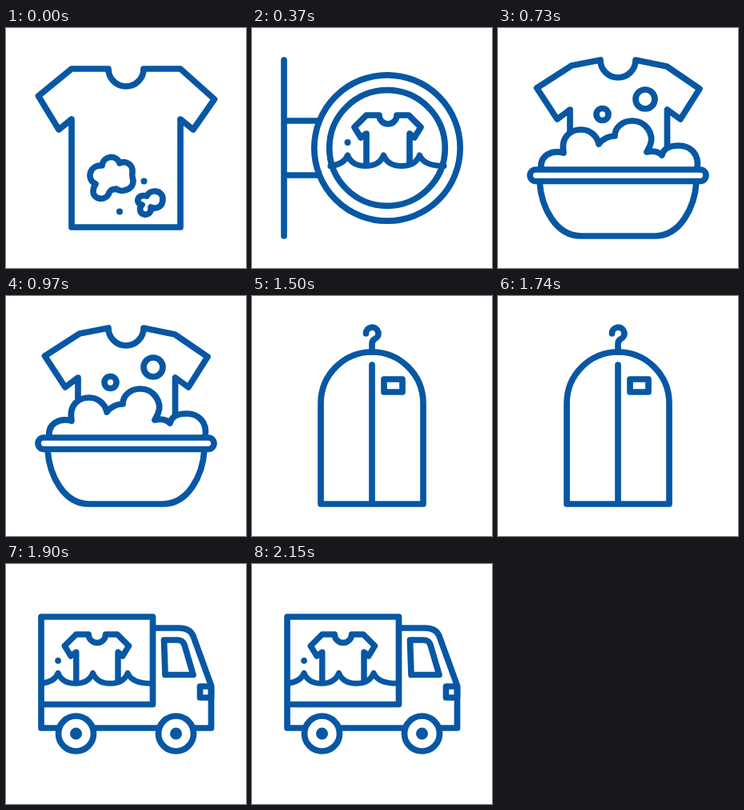
Animation of 300 by 300 pixels, one loop 2.31 s. Source, as an HTML page:

```html
<!DOCTYPE html>
<html lang="en">
<head>
<meta charset="utf-8">
<title>Laundry icons</title>
<style>
  html, body { margin: 0; width: 100%; height: 100%; overflow: hidden; background: #fff; }
  svg { display: block; width: 100%; height: 100%; }
  .icon { opacity: 0; }
  .icon:first-of-type { opacity: 1; }
  .line { fill: none; stroke: #0757a4; stroke-width: 7.7; stroke-linecap: round; stroke-linejoin: round; }
  .dot { fill: #0757a4; stroke: none; }
</style>
</head>
<body>
<svg viewBox="0 0 300 300" class="line">
  <defs>
    <g id="emblem">
      <path d="M143 170V132L136 137L128 124L143 109H159A11 11 0 0 0 181 109H196L211 124L203 137L197 132V170"/>
      <path d="M98 172.5C110 171 117 166 119.5 159C123 168 131 172.5 142 172.5C153 172.5 161 168 164.5 159C168 168 176 172.5 187 172.5C198 172.5 206 168 209.5 159C213 168 222 172.5 240 172.5" stroke-width="7.2"/>
      <circle class="dot" cx="119.5" cy="143" r="4"/>
    </g>
  </defs>

  <!-- stained shirt -->
  <g class="icon">
    <path d="M128 51H82L40.5 85L66 127L82 114V249H218V114L234 127L260.5 89L218 51H172A22 22 0 0 1 128 51Z"/>
    <path d="M120 172C122 159 138 158 142 169C150 165 159 171 158 180C157 184 158 186 159 191C159 203 143 206 138 201C131 202 130 203 128 208C124 216 109 215 109 204C109 199 111 197 112 195C100 189 104 171 120 172Z"/>
    <path d="M176 210C180 201 196 202 196 214C196 224 187 227 181 224C182 231 177 234 173 233C167 232 166 225 170 221C161 219 164 207 176 210Z"/>
    <circle class="dot" cx="172.5" cy="191.5" r="4"/>
    <circle class="dot" cx="142" cy="229.5" r="4"/>
  </g>

  <!-- shop sign -->
  <g class="icon">
    <path d="M40 40V260M40 116H82M40 184H82"/>
    <circle cx="169" cy="150" r="91.2"/>
    <circle cx="169" cy="150" r="72.3"/>
    <use href="#emblem"/>
  </g>

  <!-- wash basin -->
  <g class="icon">
    <path d="M90 128V102L74 114L48.5 75L92 47L128 40A22 22 0 0 0 172 40L211 48L252 76L228 114L211.5 102V148"/>
    <circle cx="184" cy="89" r="12"/>
    <circle cx="130.5" cy="108" r="7.5"/>
    <path d="M54 176C52 160 66 152 82 156C78 135 92 127 104 127C115 127 124 135 126 145Q134 135 146 135C146 124 156 116 168 116C184 116 196 132 190 147L186 155Q198 152 205 159C207 150 216 147 226 147C240 147 252 157 249 176"/>
    <rect x="40" y="177" width="220" height="14.5" rx="7.2"/>
    <path d="M52 192C54 224 72 260 104 260H196C228 260 246 224 248 192"/>
  </g>

  <!-- ironing board -->
  <g class="icon">
    <rect x="57" y="55" width="71" height="14.5" rx="6"/>
    <rect x="57" y="69.5" width="68.5" height="15.5" rx="6"/>
    <rect x="57" y="85" width="68.5" height="15" rx="6"/>
    <path d="M232 100H50A7.5 7.5 0 0 0 50 115H262V92C262 77 257 65 247 55C238 64 232 75 232 92V115"/>
    <path d="M73 116L217 251M217 116L73 251"/>
  </g>

  <!-- garment bag -->
  <g class="icon">
    <path d="M142.5 47A7.7 7.7 0 1 1 153 54Q150 56 150 60V70"/>
    <path d="M86 260V134A64 64 0 0 1 214 134V260ZM150 86V260"/>
    <rect x="165" y="104" width="23" height="16"/>
  </g>

  <!-- delivery van -->
  <g class="icon">
    <path d="M65 205H44V66H183.5V175.5H44M109 205H191"/>
    <path d="M187 80H216Q230 80 234 90L256.5 152V205H235"/>
    <path d="M197.5 95H214Q221 95 223 101L234 138.5H199Z"/>
    <rect x="242.5" y="153" width="14" height="14"/>
    <circle cx="87.5" cy="212" r="22"/>
    <circle class="dot" cx="87.5" cy="212" r="7.5"/>
    <circle cx="212.5" cy="212" r="22"/>
    <circle class="dot" cx="212.5" cy="212" r="7.5"/>
    <use href="#emblem" transform="translate(-50.5 -17.5) scale(.967)"/>
  </g>
</svg>
<script>
  const holds = [370, 360, 400, 370, 400, 410];
  const duration = holds.reduce((sum, ms) => sum + ms, 0);
  const easing = 'steps(1, end)';

  // Each icon is opaque only during its own hold.
  document.querySelectorAll('.icon').forEach((icon, i) => {
    let elapsed = 0;
    const keys = holds.map((ms, j) => {
      const key = { offset: elapsed / duration, opacity: Number(i === j), easing };
      elapsed += ms;
      return key;
    });
    keys.push({ ...keys.at(-1), offset: 1 });
    icon.animate(keys, { duration, iterations: Infinity, fill: 'both' });
  });
</script>
</body>
</html>
```
